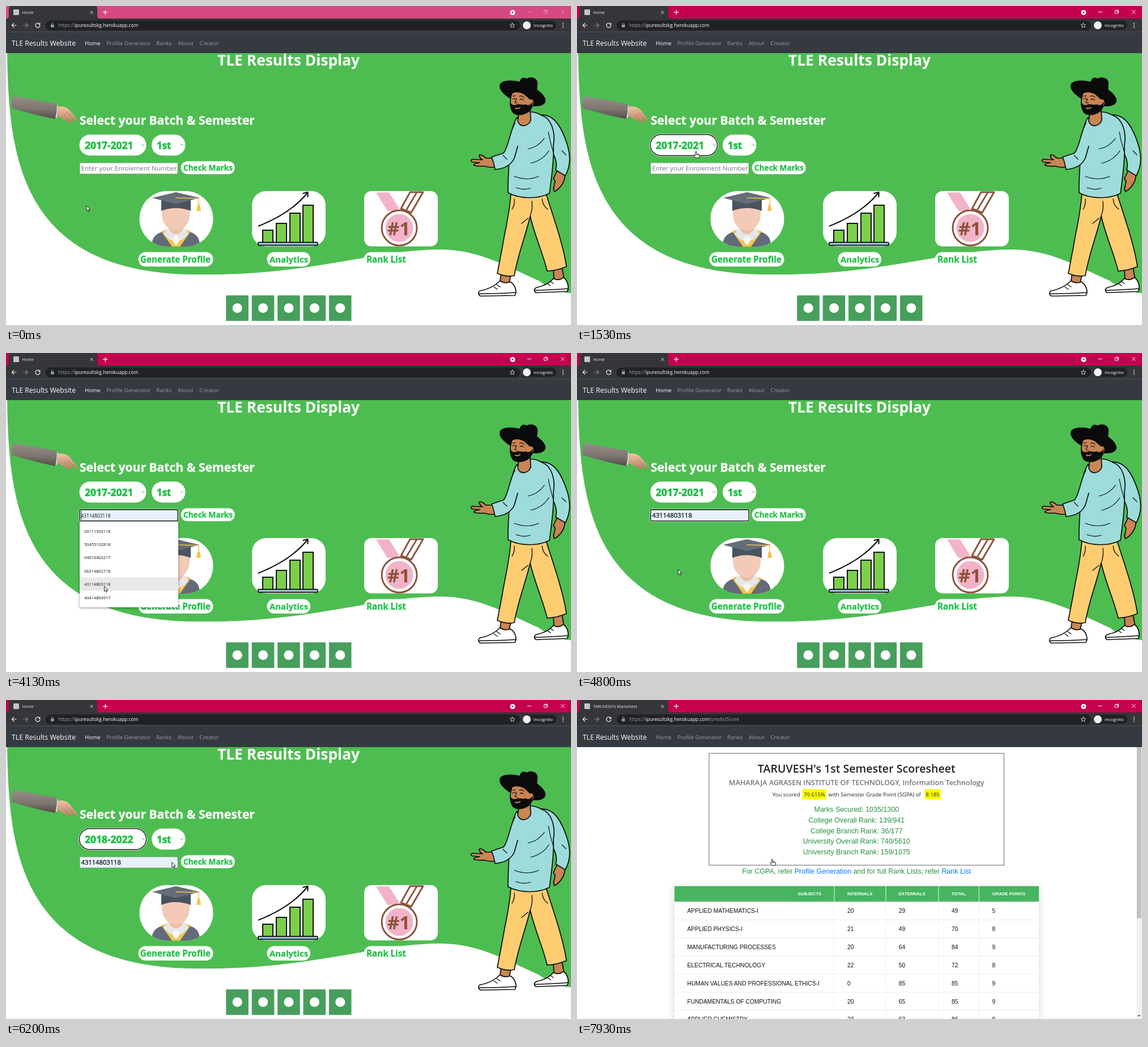
Write an HTML page that moves like this. It is 997 by 562 pixels and loops after 8000 ms.

```html
<!DOCTYPE html>
<html lang="en">
<head>
<meta charset="utf-8">
<title>Results page</title>
<style>
html, body { margin: 0; width: 100%; height: 100%; overflow: hidden; background: #fff; }
svg { display: block; width: 100vw; height: 100vh; }
text { font-family: "Open Sans", "Noto Sans", sans-serif; white-space: pre; }
.b { font-weight: 700; }
.s { font-weight: 600; }
.a { font-family: "Liberation Sans", Arial, sans-serif; }
.hand { stroke-width: .3; stroke-linejoin: round; }
.pop { filter: drop-shadow(0 1px 2px rgba(0,0,0,.45)); }
.ink { stroke: #0b0b0b; stroke-width: 1.7; stroke-linejoin: round; stroke-linecap: round; }
.line { fill: none; stroke-linecap: round; stroke-linejoin: round; }
</style>
</head>
<body>
<svg id="stage" viewBox="0 0 997 562" preserveAspectRatio="none"></svg>
<script>
const LOOP = 8000;
const GREEN = '#1fc145';
const BATCHES = ['2017-2021', '2018-2022', '2019-2023', '2020-2024'];
const TERMS = ['1st', '2nd', '3rd', '4th', '5th', '6th', '7th', '8th'];
const NUMBERS = ['00111503118', '50455102818', '04016403217', '06214802718', '43114803118', '40414804917'];
const ROW = 23.7;

const text = (x, y, size, fill, str, cls = '', more = '') =>
  `<text x="${x}" y="${y}" font-size="${size}" fill="${fill}" class="${cls}" ${more}>${str}</text>`;
const note = (x, y, size, str, fill = GREEN) =>
  text(x, y, size, fill, str, 'b hand', `stroke="${fill}"`);
const rect = (x, y, w, h, fill, r = 0, more = '') =>
  `<rect x="${x}" y="${y}" width="${w}" height="${h}" rx="${r}" fill="${fill}" ${more}/>`;
const path = (d, fill, cls = '', more = '') => `<path d="${d}" fill="${fill}" class="${cls}" ${more}/>`;
const line = (d, color, width = 1, more = '') =>
  path(d, 'none', 'line', `stroke="${color}" stroke-width="${width}" ${more}`);
const circle = (x, y, r, fill, more = '') => `<circle cx="${x}" cy="${y}" r="${r}" fill="${fill}" ${more}/>`;
const group = (id, inner, more = '') => `<g id="${id}" ${more}>${inner}</g>`;

function browser() {
  const url = `<tspan fill="#9aa0a6">https://</tspan>ipuresultskg.herokuapp.com<tspan id="route" fill="#9aa0a6"></tspan>`;
  return rect(0, 0, 997, 23, '#c5004f', 0, 'id="strip"')
    + path('M0 22.5 Q5 22.5 5 17 V4 Q5 0 9 0 H157 Q161 0 161 4 V17 Q161 22.5 166 22.5Z', '#35363a')
    + rect(0, 22, 997, 24, '#35363a')
    + group('icon', rect(13, 6, 10, 10, '#c4c5c7', 1))
    + group('spin', rect(15.5, 8.5, 5, 5, '#c4c5c7', 1)
      + line('M18 6 A5 5 0 1 1 13.6 13.4', '#8ab4f8', 1.4, 'id="arc"'))
    + `<clipPath id="tabclip"><rect x="26" y="2" width="115" height="18"/></clipPath>`
    + `<g clip-path="url(#tabclip)">${text(28.5, 13.6, 7.2, '#e8eaed', 'Home', '', 'id="tab"')}</g>`
    + line('M148.7 9 l4.6 4.6 m0 -4.6 l-4.6 4.6', '#dadce0')
    + line('M171.5 11.2 h7.4 m-3.7 -3.7 v7.4', '#fff', 1.2)
    + group('win', circle(894, 11.5, 4.5, '#fff') + path('M891.9 10.3 h4.2 l-2.1 3z', '#c5004f'))
    + group('buttons', line('M920 10.5 h6.5 M949.7 8.6 h4.6 v4.6 h-4.6z M951 8.6 v-1.3 h4.6 v4.6 h-1.3 M979.3 7.3 l6 6 m0 -6 l-6 6', '#fff', .9))
    + line('M18 34 h-7.5 m3.5 -3.6 l-3.6 3.6 l3.6 3.6', '#f1f3f4', 1.2)
    + line('M31 34 h7.5 m-3.5 -3.6 l3.6 3.6 l-3.6 3.6', '#85878a', 1.2)
    + group('reload', line('M59.2 31.6 A4 4 0 1 0 60 34.6', '#f1f3f4', 1.2) + path('M60.4 29.5 v3.7 h-3.7z', '#f1f3f4'))
    + group('stop', line('M52.7 30.5 l7 7 m0 -7 l-7 7', '#f1f3f4', 1.3))
    + rect(70, 25.5, 837, 17.5, '#202124', 8.7)
    + rect(79, 33, 5.6, 4.6, '#9aa0a6', .6) + line('M80.2 33 v-1.4 a1.6 1.6 0 0 1 3.2 0 v1.4', '#9aa0a6', .9)
    + text(92, 37, 8.47, '#fff', url)
    + line('M893.5 30 l1.2 2.7 3 .3 -2.3 2 .7 2.9 -2.6 -1.5 -2.6 1.5 .7 -2.9 -2.3 -2 3 -.3z', '#dadce0', .9)
    + rect(911, 26, 60, 16, '#202124', 8) + circle(919, 34, 7, '#f1f3f4')
    + text(931, 36.8, 7.8, '#fff', 'Incognito')
    + [30.5, 34, 37.5].map(y => circle(983, y, .95, '#f1f3f4')).join('')
    + rect(0, 45.5, 997, 37.5, '#343a40') + rect(0, 45.3, 997, .8, '#55575b')
    + text(10, 70, 12.25, '#fff', 'TLE Results Website')
    + text(139, 68.8, 9.85, '#fff', 'Home', '', 'id="home"')
    + [[177, 'Profile Generator'], [265, 'Ranks'], [303, 'About'], [341.5, 'Creator']]
      .map(([x, s]) => text(x, 68.8, 9.75, '#9a9da0', s)).join('');
}

function arm() {
  return `<linearGradient id="sleeve" x1=".05" y1="0" x2="0" y2="1"><stop offset="0" stop-color="#968e87"/>
    <stop offset=".55" stop-color="#7d756f"/><stop offset="1" stop-color="#4f4845"/></linearGradient>
    <linearGradient id="skin" x1="0" y1="0" x2="0" y2="1"><stop offset="0" stop-color="#eec4a6"/>
    <stop offset="1" stop-color="#b77f60"/></linearGradient>`
    + path('M89 178 C97 176 105 177 111 182 C117 188 122 195 127 202 Q127 205 123.5 203.5 L113 193 C117 199 118 205 114 205 C111 206 108 203 106 201 C103 201 99 198 96 196 L89 194Z', 'url(#skin)')
    + line('M103 192 Q107 199 112 203 M107 188 L114 194', '#a8704f', .8)
    + path('M88 173 L91.5 174.5 L90 197 L86 198Z', '#d8d4d0')
    + path('M13 158.5 C40 163 65 168 90 172.5 Q90 186 87 199 C60 194 35 187 10 180 Q8 167 13 158.5Z', 'url(#sleeve)');
}

function man() {
  const skin = '#c98554', shirt = '#9ddcdb', ink = (d, fill) => path(d, fill, 'ink');
  return ink('M874 470 L891 474 L887 491 L871 489Z M966 464 L981 460 L985 482 L967 484Z', skin)
    + ink('M872 484 Q880 490 890 486 Q900 492 900 505 L898 510 L837 511 Q831 507 836 502 Q858 498 872 484Z', '#fff')
    + ink('M966 480 Q975 485 984 478 Q993 486 992 499 L990 503 L935 505 Q929 500 936 496 Q956 492 966 480Z', '#fff')
    + line('M835 507 Q868 507 899 505 M933 501 Q965 500 991 498 M861 495 l6 4 M866 491 l6 4 M955 489 l6 4 M960 485 l6 4', '#0b0b0b', 1.3)
    + ink('M973 289 L986 297 C987 310 977 322 968 327 C964 323 968 316 969 309 L966 304Z', skin)
    + ink('M891 330 C888 370 880 398 876 424 L867 471 Q882 478 897 475 C902 442 917 404 925 370 C932 402 947 434 955 467 Q974 466 989 459 C983 420 968 378 953 331Z', '#fecd72')
    + line('M925 370 Q930 356 928 344 M897 340 Q898 350 893 358 M946 340 Q947 352 956 358 M921 374 L910 383', '#0b0b0b', 1.3)
    + ink('M861 268 L847 268 Q838 260 835 263 Q836 269 841 271 L823 270 Q818 272 823 275 L836 276 Q823 278 826 281 Q836 283 844 282 Q852 285 863 284Z', skin)
    + ink('M944 192 C968 191 981 215 990 243 C997 265 996 282 987 299 L970 289 C974 275 968 262 958 248Z', shirt)
    + ink('M902 196 C892 210 891 235 889 250 C888 280 885 310 886 329 C908 341 940 340 959 330 C963 300 967 270 966 245 C970 222 962 198 946 193 C937 188 930 186 925 187 C925 205 908 216 902 196Z', shirt)
    + path('M898 206 C888 225 887 248 878 259 L857 266 Q861 276 863 288 C876 287 890 283 897 268 L906 238Z', shirt)
    + line('M898 206 C888 225 887 248 878 259 L857 266 Q861 276 863 288 C876 287 890 283 897 268 L903 247', '#0b0b0b', 1.7)
    + line('M957 222 Q960 240 966 258 M921 252 Q940 248 950 233 M926 277 Q947 272 958 255 M897 300 Q920 309 940 300 M900 320 Q915 325 925 321 M981 255 L988 262 M877 263 l7 7', '#0b0b0b', 1.2)
    + ink('M905 188 L903 203 C908 216 923 211 926 201 L925 184Z', skin)
    + `<ellipse cx="911.5" cy="154" rx="43" ry="18" transform="rotate(21 911.5 154)" fill="#0b0b0b"/>`
    + path('M905 146 C904 129 911 123 919 128 C924 123 940 126 938 138 L937 150Z', '#0b0b0b')
    + ink('M893 153 C889 165 888 178 895 188 C903 194 922 192 928 178 C934 172 932 162 925 164 L916 156 C908 151 900 150 893 153Z', skin)
    + path('M890 170 C891 179 892 188 899 191 C912 195 928 188 930 168 C926 175 921 176 917 173 C911 176 906 171 900 174 C896 176 893 174 890 170Z', '#0b0b0b')
    + line('M899 180 Q903 182 907 179', '#c98554', 2)
    + line('M894 164 q3 -3 5 0 M907 165 q4 -3 6 1 M894 159 l5 -1 M906 159 q5 -2 8 2 M901 163 l-3 7 l4 1', '#0b0b0b', 1.2);
}

function graduate() {
  return rect(235.5, 326, 130, 98, '#fff', 49)
    + `<clipPath id="round"><rect x="235.5" y="326" width="130" height="98" rx="49"/></clipPath><g clip-path="url(#round)">`
    + path('M257 424 C257 405 266 400 285 395 H315 C334 400 342 405 342 424Z', '#636b78')
    + path('M274 397 L284 393 H316 L326 397 L307 424 H293Z', '#f3c34d')
    + path('M280 394 L300 389 L320 394 L301 421 H299Z', '#f4f6f7')
    + path('M283 392 L300 404 L317 392 L322 402 L310 413 L300 404 L290 413 L278 402Z', '#e3e7ea')
    + path('M287 380 H313 V393 Q300 412 287 393Z', '#eabda7')
    + path('M275 352 H324 V366 C324 385 312 396 300 396 C288 396 275 385 275 366Z', '#f3cab8')
    + path('M274 341 H326 V361 Q300 351 274 361Z', '#4b535e')
    + path('M258 338 L300 328 L342 338 L300 349Z', '#646d78')
    + line('M300 338 L340 339 V352', '#f3c34d', 1.6) + path('M338 350 h4 l2 11 h-8z', '#f3c34d') + '</g>';
}

function chart() {
  const bars = [[453, 395], [477, 383], [501, 365], [524, 351]];
  return rect(434, 326, 130, 97.5, '#fff', 25)
    + bars.map(([x, y]) => rect(x, y, 18, 417 - y, '#7bcf4b', 0, 'stroke="#111" stroke-width="2"')).join('')
    + rect(445, 416.5, 105, 5, '#a8d5f5', 1.5, 'stroke="#111" stroke-width="1.8"')
    + line('M446 387.5 Q503 365 532 329 M524.5 330 L532.5 328 L532.5 336', '#111', 2.2);
}

function medal() {
  const edge = 'stroke="#8b533b" stroke-width="3" stroke-linejoin="round"';
  return rect(632, 326, 130, 97.5, '#fff', 13)
    + path('M653 328.5 H676 L694 357 L684 361 H673Z', '#f2b3c8')
    + path('M713 328 H736 L715 364 L697 357Z', '#fff', '', edge)
    + line('M724.5 329 L706 360', '#8b533b', 2.8)
    + circle(694, 391, 31, '#fff', edge) + circle(694, 391, 24.5, '#f2b3c8')
    + text(693, 403.5, 33, '#8b533b', '#1', 'b', 'text-anchor="middle"');
}

function popup(id, x, w, items, tx) {
  return group(id, rect(x, 263.5, w, items.length * ROW, '#fff')
    + items.map((s, i) => `<g data-row="${i}">${rect(x, 263.5 + i * ROW, w, ROW, 'none')}${note(tx, 281.5 + i * ROW, 17.4, s)}</g>`).join(''), 'class="pop"');
}

function ring(id, x, y, w, h, r) {
  return group(id, rect(x - 1, y - 1, w + 2, h + 2, 'none', r + 1, 'stroke="#fff" stroke-width="1"')
    + rect(x, y, w, h, 'none', r, 'stroke="#101010" stroke-width="1.3"'));
}

function homePage() {
  const chevron = x => line(`M${x - 2} 243.8 l2.2 2.4 l2.2 -2.4`, GREEN, 1);
  return rect(0, 83, 997, 479, '#fff')
    + path('M2 83 C5 260 20 478 350 473 C540 474 650 429 768 429 C835 429 890 462 940 484 Q968 504 997 506 V83Z', '#4dbd51')
    + text(498.5, 105.3, 26.4, '#fff', 'TLE Results Display', 'b', 'text-anchor="middle"')
    + arm() + man()
    + note(130, 209, 21.1, 'Select your Batch &amp; Semester', '#fff')
    + rect(129.5, 226.5, 118, 37, '#fff', 18.5) + rect(257, 226.5, 59.5, 37, '#fff', 18.5)
    + text(139, 252, 17.5, GREEN, BATCHES[0], 'b hand', `id="batch" stroke="${GREEN}" style="stroke-width:.7"`)
    + text(266, 252, 16.9, GREEN, '1st', 'b hand', `stroke="${GREEN}" style="stroke-width:.7"`)
    + chevron(241.5) + chevron(310.3)
    + rect(130, 276.3, 173, 19.5, '#fff', 0, 'id="field" stroke="rgba(0,0,0,.3)" stroke-width=".7"')
    + text(132.5, 290, 11.5, '#757575', '', 'hand', 'id="value"')
    + rect(308.7, 273.5, 95, 22.7, '#fff', 11.3) + note(313, 290, 13.6, 'Check Marks')
    + graduate() + chart() + medal()
    + rect(233.5, 433.5, 132, 25.5, '#fff', 12.7) + rect(460.5, 433.5, 76.5, 25.5, '#fff', 12.7) + rect(631.5, 433.5, 79, 25.5, '#fff', 12.7)
    + note(237, 452, 15.2, 'Generate Profile') + note(465, 452, 14.9, 'Analytics') + note(636, 452, 15.2, 'Rank List')
    + [0, 1, 2, 3, 4].map(i => rect(388.3 + i * 45.4, 509.8, 39.6, 45, '#479f5c') + circle(408.2 + i * 45.4, 532.3, 8.5, '#fff')).join('')
    + ring('ringBatch', 129.5, 226.5, 118, 37, 18.5) + ring('ringTerm', 257, 226.5, 59.5, 37, 18.5)
    + ring('ringField', 130, 276, 173.3, 19.8, 1) + ring('ringCheck', 308.7, 273.5, 95, 22.7, 11.3)
    + rect(132.2, 278, .9, 16, '#111', 0, 'id="caret"')
    + group('ghost', rect(129.5, 263.5, 118, 95, 'none', 0, 'stroke="#000" stroke-opacity=".08" stroke-width="3"')
      + rect(129.8, 263.5, 117, 94.5, 'none', 0, 'stroke="#000" stroke-opacity=".18" stroke-width="1"'))
    + popup('batches', 129.8, 117, BATCHES, 132) + popup('terms', 257, 76, TERMS, 260)
    + group('saved', rect(130, 297, 174, 151, '#fff', 2)
      + NUMBERS.map((n, i) => `<g data-row="${i}">${rect(130, 301.8 + i * 23.4, 174, 23.4, 'none')}${text(138, 316.5 + i * 23.4, 7.4, '#111', n)}</g>`).join(''), 'class="pop"');
}

function scorePage() {
  const mid = (y, size, fill, str, cls) => text(493.3, y, size, fill, str, cls, 'text-anchor="middle"');
  const ranks = ['Marks Secured: 1035/1300', 'College Overall Rank: 139/941', 'College Branch Rank: 36/177',
    'University Overall Rank: 740/5610', 'University Branch Rank: 159/1075'];
  const rows = ['APPLIED MATHEMATICS-I|20|29|49|5', 'APPLIED PHYSICS-I|21|49|70|8', 'MANUFACTURING PROCESSES|20|64|84|9',
    'ELECTRICAL TECHNOLOGY|22|50|72|8', 'HUMAN VALUES AND PROFESSIONAL ETHICS-I|0|85|85|9',
    'FUNDAMENTALS OF COMPUTING|20|65|85|9', 'APPLIED CHEMISTRY|23|63|86|9'];
  const cols = [194.5, 477, 567.7, 661, 732.5];
  const heads = ['SUBJECTS', 'INTERNALS', 'EXTERNALS', 'TOTAL', 'GRADE POINTS'];
  const link = s => `<tspan fill="#007bff">${s}</tspan>`;
  return rect(0, 83, 997, 479, '#fff')
    + rect(233, 94, 520.5, 197, '#fff', 0, 'stroke="#8f8f8f" stroke-width="1.4"')
    + mid(128.3, 19.6, '#212529', "TARUVESH's 1st Semester Scoresheet", 's')
    + mid(150, 12.55, '#6c757d', 'MAHARAJA AGRASEN INSTITUTE OF TECHNOLOGY, Information Technology', 's')
    + rect(398, 157, 42, 18, '#ff0') + rect(613.7, 157, 28, 18, '#ff0')
    + [[344.7, 'You scored'], [400, '79.615%'], [443.5, 'with Semester Grade Point (SGPA) of'], [615.3, '8.185']]
      .map(([x, s]) => text(x, 169.8, 9.65, '#212529', s)).join('')
    + ranks.map((s, i) => mid(197.3 + i * 18.73, 12.46, '#28913f', s, 'a')).join('')
    + mid(306, 12.46, '#28913f', `For CGPA, refer ${link('Profile Generation')} and for full Rank Lists, refer ${link('Rank List')}`, 'a')
    + rect(172, 328, 643, 260, '#fff', 0, 'style="filter:drop-shadow(0 2px 7px rgba(0,0,0,.17))"')
    + rect(172, 328, 643, 27.3, '#47b560')
    + heads.map((s, i) => text(i ? cols[i] : 390, 344, 7.75, '#fff', s, 'a b')).join('')
    + [454, 545, 638, 709.5].map(x => rect(x - .5, 328, 1, 27.3, '#e6f5e9') + rect(x - .5, 355.3, 1, 207, '#f0f1f2')).join('')
    + rows.map((r, i) => r.split('|').map((s, c) => text(cols[c], 375.2 + i * 31.87, 10.28, '#111', s, 'a')).join('')
      + rect(172, 387 + i * 31.87, 643, .8, '#e6e8ea')).join('')
    + rect(987, 46, 10, 516, '#f1f1f1') + rect(988, 57, 8, 327.5, '#c1c1c1')
    + path('M989.5 53.5 l2.5 -3 l2.5 3z', '#a3a3a3') + path('M989.5 555 l2.5 3 l2.5 -3z', '#505050');
}

function pointers() {
  const edge = 'stroke="#111" stroke-width=".9" stroke-linejoin="round"';
  return group('pointer',
    group('arrow', path('M0 0 V9 L2.1 7.1 L3.6 10.3 L5 9.6 L3.6 6.6 H6.4Z', '#fff', '', edge))
    + group('hand', path('M-1 1 Q0 -1 1 1 V4.6 L5 5.4 Q6.3 5.8 6.2 7.2 L5.4 11.5 H-.8 L-3.7 7.2 Q-3.4 5.8 -2.2 6.6 L-1 7.7Z', '#fff', '', edge)
      + line('M1 5 v2 M2.6 5.2 v2 M4.2 5.5 v1.7', '#111', .6))
    + group('beam', line('M-2 -5.2 Q0 -5.2 0 -4 V4 Q0 5.2 -2 5.2 M2 -5.2 Q0 -5.2 0 -4 M0 4 Q0 5.2 2 5.2', '#222', .9)));
}

const stage = document.getElementById('stage');
stage.innerHTML = group('first', homePage()) + group('second', scorePage()) + browser() + pointers();
const $ = id => document.getElementById(id);
const show = (id, on) => { $(id).style.display = on ? '' : 'none'; };

// [time, value]: the last entry that has begun applies
const FOCUS = [[0, ''], [1530, 'Batch'], [2130, ''], [2670, 'Term'], [3130, 'Field'], [5330, ''], [6000, 'Batch'], [6530, 'Check']];
const POINTER = [[0, 'arrow'], [650, 'hand'], [2770, 'arrow'], [2930, 'beam'], [3570, 'arrow'], [4940, 'hand'],
  [5460, 'arrow'], [6240, 'hand']];
const PATH = [[0, 142, 352], [400, 142, 352], [800, 210, 256], [1530, 210, 256], [1870, 284, 246], [2670, 284, 246],
  [3050, 228, 285], [3530, 228, 285], [3930, 173.5, 411], [4730, 173.5, 411], [5000, 201, 237], [5330, 201, 237],
  [5730, 192, 297], [6000, 192, 297], [6330, 344.5, 280], [LOOP, 344.5, 280]];

const at = (table, t) => table.filter(e => e[0] <= t).pop()[1];
const within = (t, a, b) => t >= a && t < b;

function spot(t) {
  const i = PATH.findIndex(p => p[0] > t);
  const [t0, x0, y0] = PATH[i - 1], [t1, x1, y1] = PATH[i];
  const u = (t - t0) / (t1 - t0), k = u * u * (3 - 2 * u);
  return [x0 + (x1 - x0) * k, y0 + (y1 - y0) * k];
}

function pick(id, row, back, ink) {
  $(id).querySelectorAll('[data-row]').forEach((g, i) => {
    g.firstChild.setAttribute('fill', i === row ? back : 'none');
    if (!ink) return;
    g.lastChild.setAttribute('fill', i === row ? '#fff' : ink);
    g.lastChild.setAttribute('stroke', i === row ? '#fff' : ink);
  });
}

function draw(t) {
  const [x, y] = spot(t), kind = at(POINTER, t), focus = at(FOCUS, t);
  const active = t >= 1000, busy = within(t, 6670, 7930), done = t >= 7930;
  $('pointer').setAttribute('transform', `translate(${x} ${y})`);
  for (const k of ['arrow', 'hand', 'beam']) show(k, k === kind);
  for (const k of ['Batch', 'Term', 'Field', 'Check']) show('ring' + k, k === focus);

  $('strip').setAttribute('fill', active ? '#c5004f' : '#d64983');
  $('buttons').style.opacity = active ? 1 : .4;
  show('icon', !busy);
  show('spin', busy);
  show('stop', busy);
  show('reload', !busy);
  $('arc').setAttribute('stroke', t < 7530 ? '#9aa0a6' : '#8ab4f8');
  $('arc').setAttribute('transform', `rotate(${(t < 7530 ? -.3 : .4) * (t - 6670)} 18 11)`);
  $('tab').textContent = done ? "TARUVESH's Marksheet" : t >= 7600 ? 'https://ipuresultskg.herokuapp.com' : 'Home';
  $('route').textContent = t >= 7530 ? '/predictScore' : '';
  $('home').setAttribute('fill', done ? '#9a9da0' : '#fff');
  show('first', !done);
  show('second', done);

  show('ghost', within(t, 1000, 1070) || within(t, 5330, 5400));
  show('batches', within(t, 1070, 1530) || within(t, 5400, 6000));
  show('terms', within(t, 2130, 2670));
  show('saved', within(t, 3130, 4730));
  pick('batches', y > 263.5 + ROW ? 1 : 0, '#1967d2', GREEN);
  pick('terms', 0, '#1967d2', GREEN);
  $('batch').textContent = BATCHES[t >= 6000 ? 1 : 0];

  const hover = within(t, 3530, 4730) && y > 301.8 ? Math.floor((y - 301.8) / 23.4) : -1;
  const filled = t >= 4730, preview = hover >= 0, value = $('value');
  pick('saved', hover, '#e8e8e8');
  value.textContent = filled ? NUMBERS[4] : preview ? NUMBERS[hover] : 'Enter your Enrolement Number';
  value.setAttribute('font-size', filled ? 11.2 : preview ? 8.25 : 11.5);
  value.setAttribute('fill', filled || preview ? '#111' : '#757575');
  value.setAttribute('stroke', filled ? '#111' : 'none');
  $('field').setAttribute('fill', filled || preview ? '#e8f0fe' : '#fff');
  show('caret', within(t, 3130, 3600) || within(t, 4130, 4730));
}

function tick(now) {
  draw(now % LOOP);
  requestAnimationFrame(tick);
}
draw(0);
requestAnimationFrame(tick);
</script>
</body>
</html>
```
